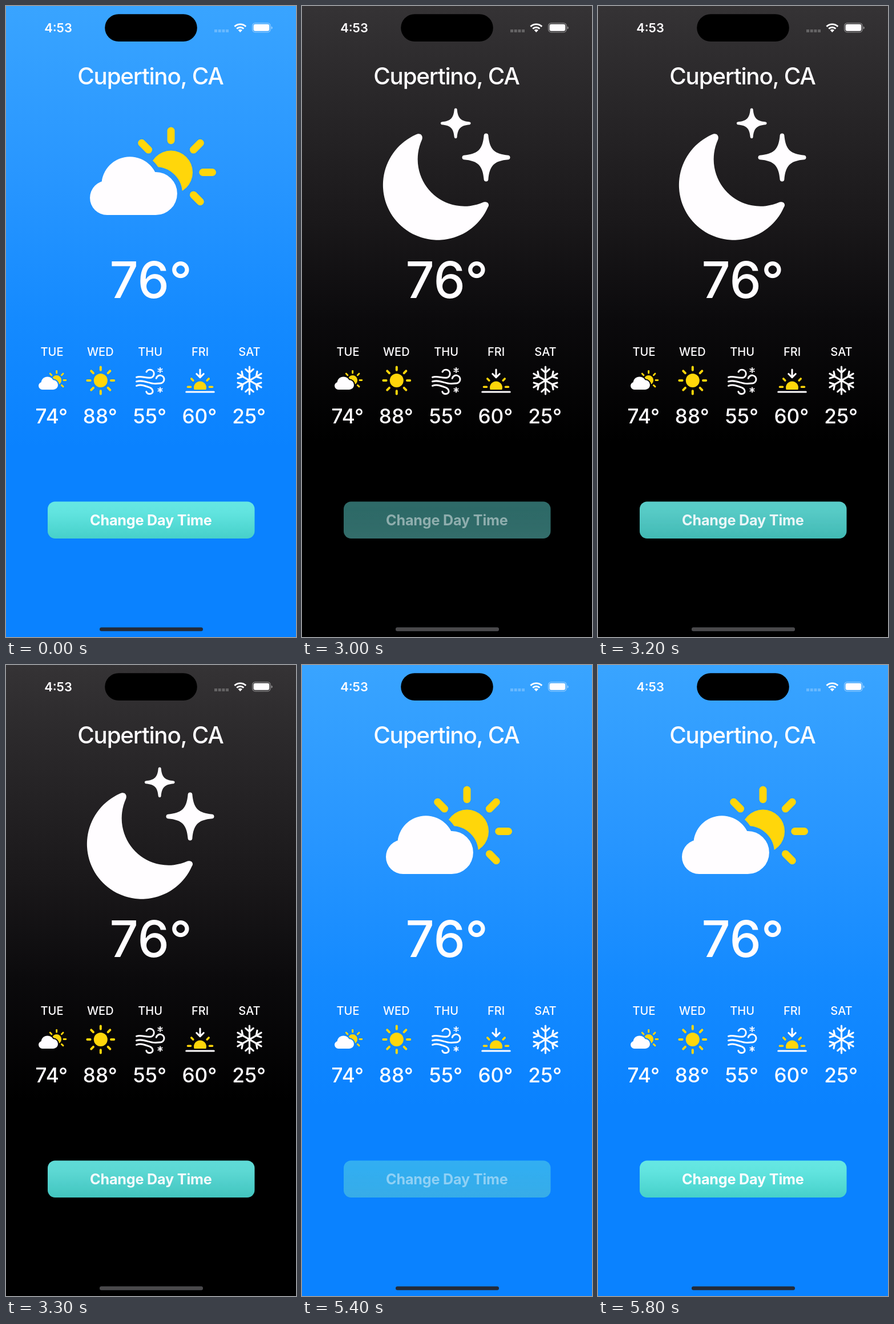
Recreate the animation shown at these times as an HTML page. Size 508x1102 px, loop 5900 ms.

```html
<!DOCTYPE html>
<html lang="en">
<head>
<meta charset="utf-8">
<title>Weather</title>
<style>
  html, body { margin: 0; width: 100%; height: 100%; overflow: hidden; background: #0a82ff; }
  svg { display: block; width: 100%; height: 100%; }
  text { font-family: Inter, "Open Sans", sans-serif; font-weight: 500; text-anchor: middle; fill: var(--white); }
  :root { --white: #fffdff; --sun: #ffd60a; }

  .city { font-size: 40.3px; letter-spacing: -1.2px; }
  .now { font-size: 88px; }
  .day { font-size: 20px; }
  .temp { font-size: 35.2px; }
  .clock { font-size: 21.8px; font-weight: 600; }
  .label { font-size: 25.2px; font-weight: 700; letter-spacing: -.2px; }

  .white { fill: var(--white); }
  .sun { fill: var(--sun); }
  .line { fill: none; stroke: var(--white); stroke-linecap: round; stroke-linejoin: round; }
  .rays { fill: none; stroke: var(--sun); stroke-linecap: round; }

  .night { animation: night 5.9s step-end infinite; }
  .light { animation: light 5.9s step-end infinite; }
  .press { animation: press 5.9s step-end infinite; }
  .gloss { animation: gloss 5.9s step-end infinite; }

  @keyframes night {
    0% { opacity: 0; }
    50.847% { opacity: 1; }
    91.525%, 100% { opacity: 0; }
  }
  @keyframes light {
    0% { opacity: 1; }
    50.847% { opacity: 0; }
    91.525%, 100% { opacity: 1; }
  }
  /* the pressed button fades back in 100 ms steps */
  @keyframes press {
    0% { opacity: 1; }
    50.847% { opacity: .46; }
    52.542% { opacity: .71; }
    54.237% { opacity: .89; }
    55.932% { opacity: .95; }
    57.627% { opacity: .98; }
    59.322% { opacity: 1; }
    91.525% { opacity: .45; }
    93.220% { opacity: .68; }
    94.915% { opacity: .86; }
    96.610% { opacity: .95; }
    98.305%, 100% { opacity: 1; }
  }
  @keyframes gloss {
    0% { opacity: 0; }
    50.847% { opacity: 1; }
    52.542% { opacity: .6; }
    54.237% { opacity: .25; }
    55.932% { opacity: 0; }
    91.525% { opacity: 1; }
    93.220% { opacity: .6; }
    94.915% { opacity: .25; }
    96.610%, 100% { opacity: 0; }
  }
</style>
</head>
<body>
<svg viewBox="0 0 508 1102" preserveAspectRatio="none">
  <defs>
    <linearGradient id="sky" x2="0" y2="1">
      <stop offset="0" stop-color="#39a4ff"/>
      <stop offset=".27" stop-color="#2896ff"/>
      <stop offset=".5" stop-color="#148aff"/>
      <stop offset=".7" stop-color="#0a82ff"/>
    </linearGradient>
    <linearGradient id="dark" x2="0" y2="1">
      <stop offset="0" stop-color="#353335"/>
      <stop offset=".12" stop-color="#2b292b"/>
      <stop offset=".34" stop-color="#1a181a"/>
      <stop offset=".5" stop-color="#0b0a0c"/>
      <stop offset=".69" stop-color="#000"/>
    </linearGradient>
    <linearGradient id="mint" x2="0" y2="1">
      <stop offset="0" stop-color="#66e7e3"/>
      <stop offset=".3" stop-color="#61e4df"/>
      <stop offset="1" stop-color="#46d0ca"/>
    </linearGradient>
    <linearGradient id="shine" x2="0" y2="1">
      <stop offset=".2" stop-color="#fff" stop-opacity="0"/>
      <stop offset="1" stop-color="#fff" stop-opacity=".09"/>
    </linearGradient>

    <g id="cloud">
      <circle cx="177" cy="335" r="30"/>
      <circle cx="217" cy="313" r="49.8"/>
      <circle cx="262.3" cy="327.5" r="37.6"/>
      <path d="M177 325H262V365H177Z"/>
    </g>
    <mask id="gap" maskUnits="userSpaceOnUse" x="140" y="200" width="240" height="180">
      <path d="M140 200H380V380H140Z" fill="#fff"/>
      <use href="#cloud" stroke="#000" stroke-width="18"/>
    </mask>
    <g id="cloudSun">
      <circle class="sun" cx="289" cy="290.5" r="38" mask="url(#gap)"/>
      <g class="rays" stroke-width="13" transform="translate(289 290.5)">
        <path id="ray" d="M55.8 0H72.5"/>
        <use href="#ray" transform="rotate(45)"/>
        <use href="#ray" transform="rotate(-45)"/>
        <use href="#ray" transform="rotate(-90)"/>
        <use href="#ray" transform="rotate(-135)"/>
      </g>
      <use href="#cloud" class="white"/>
    </g>

    <path id="star" d="M3.8-39C6-14 14-6 39-3.8A3.9 3.9 0 0 1 39 3.8C14 6 6 14 3.8 39A3.9 3.9 0 0 1-3.8 39C-6 14-14 6-39 3.8A3.9 3.9 0 0 1-39-3.8C-14-6-6-14-3.8-39A3.9 3.9 0 0 1 3.8-39Z"/>
    <path id="flake" d="M0-4V4M-3.5-2L3.5 2M-3.5 2L3.5-2"/>
    <path id="arm" d="M0-23.8V23.8M-6.8-19.6L0-13.6L6.8-19.6M-6.8 19.6L0 13.6L6.8 19.6"/>
    <path id="cross" d="M18.2 0H23.4M-18.2 0H-23.4M0 18.2V23.4M0-18.2V-23.4"/>
  </defs>

  <path fill="url(#sky)" d="M0 0H508V1102H0Z"/>
  <path class="night" fill="url(#dark)" d="M0 0H508V1102H0Z"/>

  <!-- status bar -->
  <rect x="173.2" y="14.2" width="161.6" height="47.8" rx="23.9"/>
  <text class="clock" x="91.5" y="46">4:53</text>
  <path d="M365 43.5H390" stroke="#fff" stroke-opacity=".25" stroke-width="5" stroke-dasharray="5 1.7"/>
  <g transform="translate(410.3 46)">
    <path class="white" d="M0 0L-3.6-3.7A5.2 5.2 0 0 1 3.6-3.7Z"/>
    <path fill="none" stroke="#fffdff" stroke-width="2.9" d="M-6.1-6.3A8.8 8.8 0 0 1 6.1-6.3M-9.9-10.1A14.2 14.2 0 0 1 9.9-10.1"/>
  </g>
  <rect x="431.6" y="29.8" width="31.6" height="16" rx="5" fill="none" stroke="#fff" stroke-opacity=".42" stroke-width="1.3"/>
  <rect class="white" x="433.5" y="31.8" width="27.8" height="12" rx="3.2"/>
  <path d="M464.6 35.4Q466.9 36 466.9 38T464.6 40.6Z" fill="#fff" fill-opacity=".45"/>

  <text class="city" x="252.9" y="136.5">Cupertino, CA</text>

  <use class="light" href="#cloudSun"/>
  <g class="night white">
    <path transform="translate(-.4 -.4)" d="M200 225C208 221 213 227 210.5 234A82 82 0 0 0 318.5 343C325 341 330 346 326 352A96 96 0 1 1 200 225Z"/>
    <use href="#star" x="322.5" y="264.5"/>
    <use href="#star" transform="translate(269.2 204.8) scale(.628)"/>
  </g>

  <text class="now" x="253.8" y="510">76°</text>

  <!-- forecast -->
  <g>
    <text class="day" x="80.5" y="611">TUE</text>
    <text class="day" x="165.3" y="611">WED</text>
    <text class="day" x="252.6" y="611">THU</text>
    <text class="day" x="340" y="611">FRI</text>
    <text class="day" x="426.5" y="611">SAT</text>
    <text class="temp" x="79.8" y="728.5">74°</text>
    <text class="temp" x="164.8" y="728.5">88°</text>
    <text class="temp" x="251.8" y="728.5">55°</text>
    <text class="temp" x="338.9" y="728.5">60°</text>
    <text class="temp" x="425.7" y="728.5">25°</text>
  </g>

  <use href="#cloudSun" transform="translate(81 654) scale(.2222) translate(-254.5 -293)"/>

  <g transform="translate(165.8 654)">
    <circle class="sun" r="12"/>
    <g class="rays" stroke-width="4">
      <use href="#cross"/>
      <use href="#cross" transform="rotate(45)"/>
    </g>
  </g>

  <g class="line" stroke-width="3">
    <path d="M228.5 648.3C236 645.5 243 649.5 251.5 649.2A7 7 0 1 0 246 639"/>
    <path d="M228.5 655.8C241 652 250 660 262 659.6L269.5 659A7 7 0 1 0 263.2 650.3"/>
    <path d="M228.5 663.3C236 660.5 242 663 248 665C260 668 259 677.5 251.5 677.5Q247 677.5 245.8 673.5"/>
    <g stroke-width="2">
      <use href="#flake" x="270" y="636"/>
      <use href="#flake" x="270" y="670.5"/>
    </g>
  </g>

  <g>
    <path class="sun" d="M329.6 670A11 11 0 1 1 350.4 670Z"/>
    <path class="rays" stroke-width="3.6" d="M318.5 665.3H323.5M356.5 665.3H361.5M324.8 651L327.8 654M355.2 651L352.2 654"/>
    <path class="line" stroke-width="3.1" d="M340 635V648M333.8 642.5L340 648.7L346.2 642.5M315.8 674H364.2"/>
  </g>

  <g class="line" stroke-width="3.2" transform="translate(426.5 654)">
    <use href="#arm"/>
    <use href="#arm" transform="rotate(60)"/>
    <use href="#arm" transform="rotate(-60)"/>
  </g>

  <!-- button: box and label fade separately -->
  <rect class="press" x="73" y="865.5" width="362.5" height="64.5" rx="13" fill="url(#mint)"/>
  <rect class="gloss" x="73" y="865.5" width="362.5" height="64.5" rx="13" fill="url(#shine)"/>
  <text class="label press" x="253.8" y="906.5">Change Day Time</text>

  <rect x="164" y="1085.3" width="181" height="6.4" rx="3.2" fill="#232a38"/>
  <rect class="night" x="164" y="1085.3" width="181" height="6.4" rx="3.2" fill="#4a494b"/>
</svg>
</body>
</html>
```
